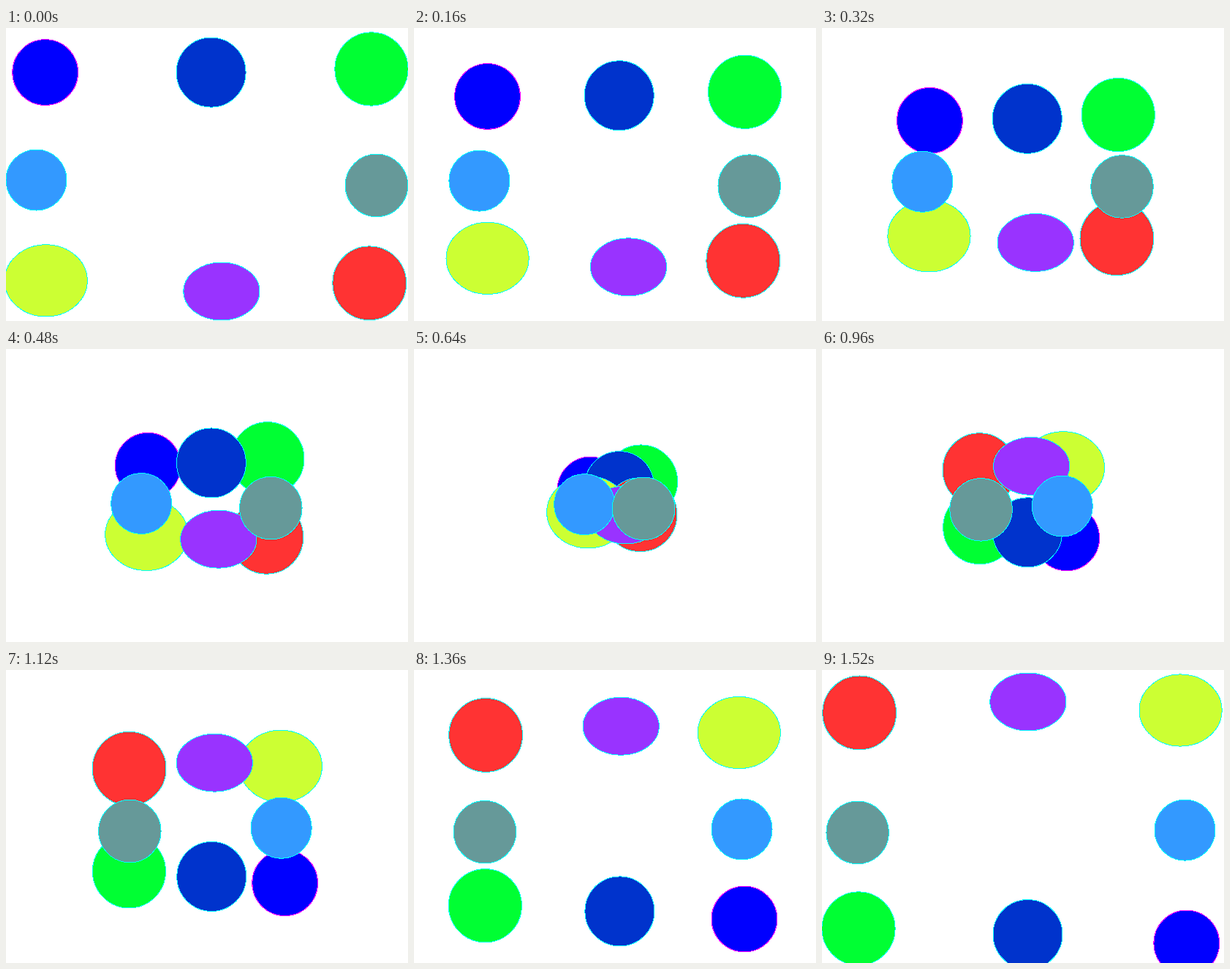
An HTML page for the animation above (1600 ms loop, 550 by 400 pixels).

```html
<!DOCTYPE html>
<html lang="en">
<head>
<meta charset="utf-8">
<title>Crossing discs</title>
<style>
  html, body { margin: 0; height: 100%; overflow: hidden; background: #fff; }
  svg { display: block; }
</style>
</head>
<body>
<svg id="stage" width="550" height="400" shape-rendering="crispEdges"></svg>
<script>
const stage = document.getElementById('stage');
const STEP_MS = 80, STEPS = 20;

// Back to front: fill, radii, start centre, end centre, outline
const discs = [
  ['#0000ff', 45.4, 45.4, 53.7, 60.6, 498.8, 372.9, '#ff00ff'],
  ['#00ff33', 50.6, 50.6, 500, 56, 50, 353],
  ['#0033cc', 48, 48, 280.6, 60.6, 281.5, 361],
  ['#ff3333', 50.9, 50.9, 497.3, 348.3, 51.2, 58.4],
  ['#ccff33', 57.1, 49.6, 54.7, 344.9, 490.6, 55],
  ['#9933ff', 52.6, 40, 294.9, 359.5, 281.9, 43.5],
  ['#3399ff', 42, 42, 41.5, 207.5, 496.5, 218.6],
  ['#669999', 43.3, 43.3, 507, 214.9, 48.7, 221.9],
].map(([fill, rx, ry, x0, y0, x1, y1, stroke = '#00ffff']) => {
  const node = document.createElementNS('http://www.w3.org/2000/svg', 'ellipse');
  setAttributes(node, { fill, stroke, rx: rx - 0.5, ry: ry - 0.5 });
  stage.append(node);
  return { node, x0, y0, x1, y1 };
});

function setAttributes(node, attributes) {
  for (const name in attributes) node.setAttribute(name, attributes[name]);
}

function render() {
  const step = Math.floor(performance.now() / STEP_MS) % STEPS;
  const progress = step / (STEPS - 1);
  for (const { node, x0, y0, x1, y1 } of discs) {
    setAttributes(node, {
      cx: x0 + (x1 - x0) * progress,
      cy: y0 + (y1 - y0) * progress,
    });
  }
  requestAnimationFrame(render);
}
render();
</script>
</body>
</html>
```
